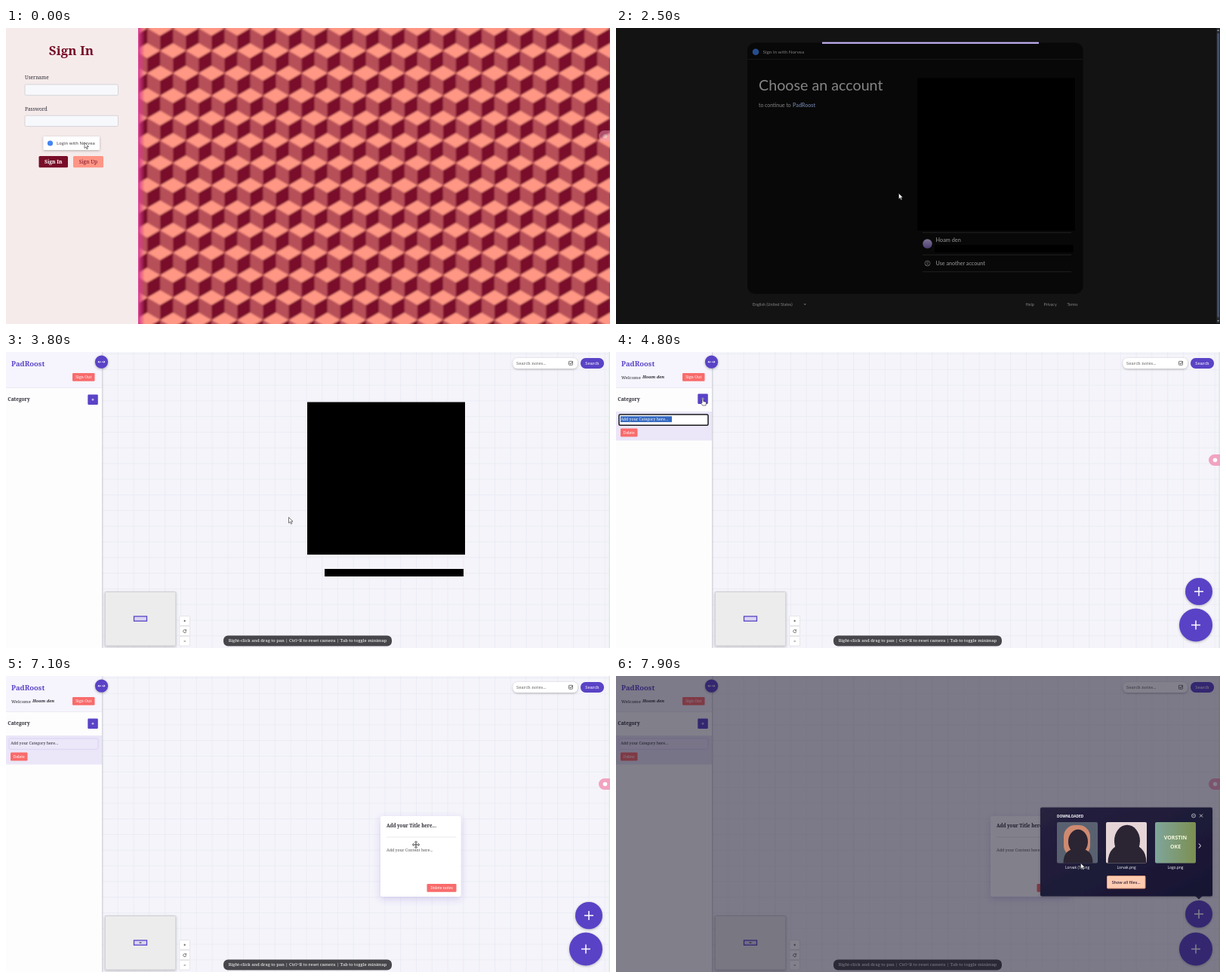
These frames come from a looping animation (800x393 px, 8000 ms). An HTML page:

```html
<!DOCTYPE html>
<html lang="en">
<head>
<meta charset="utf-8">
<title>Notes demo</title>
<style>
  html, body { margin: 0; width: 100%; height: 100%; overflow: hidden; background: #202124; }
  svg { display: block; width: 100vw; height: 100vh; }
  text { white-space: pre; }
  .serif { font-family: "Noto Serif", serif; }
  .sans { font-family: Lato, sans-serif; }
  .open { font-family: "Open Sans", sans-serif; }
</style>
</head>
<body>
<svg id="stage" viewBox="0 0 800 393" xmlns="http://www.w3.org/2000/svg"></svg>
<script>
const LOOP = 8000, STEP = 100;
const PURPLE = '#5a43c6', RED = '#f96b6b', INK = '#2b2b35';
const stage = document.getElementById('stage');

// y is the middle of the line
const text = (x, y, str, size, fill, extra = '', family = 'serif') =>
  `<text class="${family}" x="${x}" y="${y + size * 0.34}" font-size="${size}" fill="${fill}" ${extra}>${str}</text>`;
const rect = (x, y, w, h, fill, r = 0, extra = '') =>
  `<rect x="${x}" y="${y}" width="${w}" height="${h}" rx="${r}" fill="${fill}" ${extra}/>`;
const circle = (x, y, r, fill, extra = '') =>
  `<circle cx="${x}" cy="${y}" r="${r}" fill="${fill}" ${extra}/>`;
const line = (d, color, width = 0.6, extra = '') =>
  `<path d="${d}" fill="none" stroke="${color}" stroke-width="${width}" ${extra}/>`;
const group = (id, body) => `<g id="${id}">${body}</g>`;
const MID = 'text-anchor="middle"', BOLD = 'font-weight="700"', SHADE = 'filter="url(#shade)"';

function cubes(w, row) {
  const half = w / 2, r = row / 3;
  const one = (x, y) =>
    `<path fill="#ff9784" d="M${x - half} ${y}l${half} ${-r}l${half} ${r}l${-half} ${r}z"/>` +
    `<path fill="#790e29" d="M${x} ${y + r}l${half} ${-r}v${2 * r}l${-half} ${r}z"/>`;
  let s = rect(0, 0, w, row * 2, '#b75059');
  for (let k = -1; k < 3; k++)
    for (let i = -1; i < 3; i++) s += one(i * w + (k & 1 ? half : 0), k * row);
  return `<pattern id="cubes" width="${w}" height="${row * 2}" patternUnits="userSpaceOnUse" patternTransform="translate(408.6 .4)">${s}</pattern>`;
}

const defs = `<defs>
  ${cubes(34.06, 29.8)}
  <pattern id="grid" x="127" y="2" width="20.8" height="20.8" patternUnits="userSpaceOnUse">
    <path d="M0 .4H20.8M.4 0V20.8" stroke="#e9e9f3" stroke-width=".8"/></pattern>
  <filter id="soft" x="0" y="0" width="100%" height="100%"><feGaussianBlur stdDeviation=".8"/></filter>
  <filter id="shade" x="-30%" y="-30%" width="160%" height="170%">
    <feDropShadow dx="0" dy="1" stdDeviation="1.4" flood-color="#333" flood-opacity=".35"/></filter>
  <filter id="lift" x="-30%" y="-30%" width="160%" height="170%">
    <feDropShadow dx="0" dy="3" stdDeviation="5" flood-color="#5a43c6" flood-opacity=".22"/></filter>
  <linearGradient id="edge"><stop stop-color="#d63a8c"/><stop offset="1" stop-color="#d63a8c" stop-opacity="0"/></linearGradient>
  <linearGradient id="avatar" x2="0" y2="1"><stop stop-color="#d9c8fa"/><stop offset="1" stop-color="#8266c8"/></linearGradient>
  <linearGradient id="panel" x2="1" y2="1"><stop stop-color="#26213f"/><stop offset="1" stop-color="#171532"/></linearGradient>
  <linearGradient id="olive"><stop stop-color="#7fa69c"/><stop offset="1" stop-color="#7c8f50"/></linearGradient>
  <clipPath id="card"><rect x="174" y="18" width="444" height="335" rx="8"/></clipPath>
</defs>`;

const field = y => rect(25, y, 123.5, 14.3, '#f6f8fb', 1.5, 'stroke="#c9c9cf" stroke-width=".7"');
const signIn =
  rect(0, 0, 800, 393, '#f6ebeb') +
  rect(175, -3, 628, 400, 'url(#cubes)', 0, 'filter="url(#soft)"') +
  rect(175, 0, 9, 393, 'url(#edge)') +
  text(86.5, 30.5, 'Sign In', 17, '#780d28', MID + BOLD) +
  text(25, 66, 'Username', 6.5, INK) + field(75) +
  text(25, 107.5, 'Password', 6.5, INK) + field(116.3) +
  rect(49.5, 144, 74.5, 18, '#fff', 1, SHADE) +
  circle(58.5, 153, 3.6, '#4285f4') +
  text(67, 153.3, 'Login with Norvea', 5.8, '#666', 'font-weight="600"', 'open') +
  rect(43.5, 170, 38.5, 15.3, '#780d28', 1.5) +
  text(62.7, 177.7, 'Sign In', 6.7, '#fff', MID + ' font-weight="600"') +
  rect(89, 170, 40, 15.3, '#ff9585', 1.5) +
  text(109, 177.7, 'Sign Up', 6.7, '#780d28', MID + ' font-weight="500"');

const chooser =
  rect(0, 0, 800, 393, '#202022') +
  rect(174, 19.5, 444.5, 333.5, '#0e0e0e', 10) +
  circle(185, 31.7, 4.3, '#4285f4') +
  text(194.5, 31.7, 'Sign in with Norvea', 6.4, '#d5d5d5', '', 'sans') +
  line('M174 41.5H618', '#3a3a3a') +
  text(189, 76.5, 'Choose an account', 19.7, '#e3e3e3', '', 'sans') +
  text(189, 103, 'to continue to', 6.9, '#e3e3e3', '', 'sans') +
  text(234, 103, 'PadRoost', 7.1, '#a8c0f8', BOLD, 'sans') +
  line('M406 271.7H603M406 301.2H603M406 323.7H603', '#555') +
  circle(412.5, 286.5, 6.2, 'url(#avatar)') +
  text(423.5, 282, 'Hoam den', 7.3, '#e3e3e3', 'font-weight="600"', 'sans') +
  circle(412.5, 312.5, 3.5, 'none', 'stroke="#d0d0d0" stroke-width=".7"') +
  circle(412.5, 311.6, 1.1, 'none', 'stroke="#d0d0d0" stroke-width=".6"') +
  line('M410.2 314.9Q412.5 312.8 414.8 314.9', '#d0d0d0') +
  text(423.5, 312.5, 'Use another account', 7.2, '#e3e3e3', 'font-weight="600"', 'sans') +
  text(181, 367, 'English (United States)', 5.4, '#ddd', '', 'sans') +
  '<path d="M248.5 366.2h3.4l-1.7 1.8z" fill="#ccc"/>' +
  text(542.5, 367, 'Help', 5.4, '#ddd', '', 'sans') +
  text(566.5, 367, 'Privacy', 5.4, '#ddd', '', 'sans') +
  text(597.5, 367, 'Terms', 5.4, '#ddd', '', 'sans') +
  rect(0, 0, 800, 393, '#000', 0, 'id="dim"') +
  `<g clip-path="url(#card)">${rect(0, 18.7, 287, 2.2, '#c3b0f2', 0, 'id="bar"')}</g>` +
  rect(795.5, 0, 4.5, 393, '#2a2d34') + rect(796.3, 7, 2.6, 377, '#46526a', 1.3) +
  '<path d="M796.2 4l1.4-2 1.4 2zM796.2 388l1.4 2 1.4-2z" fill="#9aa"/>' +
  rect(0, 392, 800, 1, '#111');

const button = (x, y, w, h, label, size) =>
  rect(x, y, w, h, RED, 1.3) + text(x + w / 2, y + h / 2, label, size, '#fff', MID);
const zoom = (y, mark) =>
  rect(229.8, y - 6.4, 13.8, 12.6, '#fff', 1, 'stroke="#d5d5da" stroke-width=".6"') + line(mark, '#444', 0.7);
const plus = (x, y, r) => `M${x - r} ${y}h${2 * r}M${x} ${y - r}v${2 * r}`;
const fab = (id, x, y, r) =>
  group(id, circle(x, y, r, PURPLE, SHADE) + line(plus(x, y, 6), '#fff', 1.5));

const app =
  rect(0, 0, 800, 393, '#f4f4fa') + rect(127, 0, 673, 393, 'url(#grid)') +
  rect(0, 0, 127, 393, '#fdfdfe', 0, SHADE) +
  rect(0, 0, 127, 47.5, '#f6f4fc') + line('M0 47.5H127', '#e4e2ef') +
  text(7, 15.5, 'PadRoost', 9.4, PURPLE, BOLD) +
  group('welcome', text(7, 33.5, 'Welcome', 5.9, INK) +
    text(35, 33.5, 'Hoam den', 5.6, INK, BOLD + ' font-style="italic"')) +
  button(88, 28, 29.5, 10.8, 'Sign Out', 5.2) +
  text(2.3, 63.2, 'Category', 6.5, INK, BOLD) +
  group('add', rect(108.3, 56.5, 13.5, 13.5, PURPLE, 1.3) + line(plus(115, 63.2, 1.6), '#fff', 0.7)) +
  group('item', rect(0, 79, 127, 38.5, '#ebe6f8') +
    rect(4, 83, 118, 14.3, '#ece7f9', 1.5, 'id="input"') +
    rect(6, 85.3, 68, 7.8, '#3468c0', 0, 'id="mark"') +
    text(6.3, 89, 'Add your Category here...', 5.2, INK, 'id="label"') +
    button(6, 101.5, 22.5, 11, 'Delete', 5)) +
  circle(126.5, 13.2, 8.6, PURPLE, SHADE) +
  line('M126 13.2h-4m1.3-1.3l-1.3 1.3 1.3 1.3M127 13.2h4m-1.3-1.3l1.3 1.3-1.3 1.3', '#fff', 0.8) +
  rect(671.5, 8, 85.5, 14, '#fff', 6, SHADE) +
  text(676, 15, 'Search notes...', 5.8, '#666') +
  rect(745.5, 12.3, 5, 5, '#fff', 0.6, 'stroke="#444" stroke-width=".7"') +
  line('M746.5 14.7l1.3 1.4 2.8-3.5', '#333', 0.8) +
  rect(761, 8, 31, 14, PURPLE, 6.5) + text(776.5, 15, 'Search', 5.7, '#fff', MID) +
  rect(131.3, 318.5, 93.5, 71.5, '#ececec', 1, SHADE + ' stroke="#c8c8ce" stroke-width=".7"') +
  rect(169.5, 351, 17, 6.2, '#d9d5f0', 0, `stroke="${PURPLE}" stroke-width="1.3"`) +
  rect(0, 0, 2.8, 1.5, '#5a5a70', 0, 'id="dot"') +
  zoom(357, plus(236.7, 357, 1.3)) +
  zoom(370.5, 'M238.3 369.5a2 2 0 1 0 .4 1.6M238.7 368.3v1.7h-1.7') +
  zoom(384, 'M235.5 384h2.5') +
  rect(288, 376.5, 223, 14, '#47474b', 6) +
  text(399.5, 383.5, 'Right-click and drag to pan | Ctrl+R to reset camera | Tab to toggle minimap', 5.8, '#fff', MID) +
  group('note', rect(0, 0, 106.5, 107, '#fff', 3, 'filter="url(#lift)"') +
    text(8, 13, 'Add your Title here...', 6.15, INK, BOLD) +
    line('M8 28H100', '#dcdce4') +
    text(8, 45.5, 'Add your Content here...', 5.3, '#555') +
    button(61.5, 90, 39, 10.8, 'Delete notes', 5.1)) +
  group('fabs', fab('upper', 772, 318, 18) + fab('lower', 768, 362.5, 22)) +
  rect(798.5, 0, 1.5, 393, '#dcebd8');

const widget = '<path d="M800 136h-7.5a7.5 7.5 0 0 0 0 15h7.5z" fill="#f2a3c0"/>' +
  circle(793.5, 143.5, 2.8, '#fff');

const thumb = (x, bg, art, name) => rect(x, 194, 54, 54.5, bg, 2) + art +
  text(x + 27, 254, name, 4.9, '#fff', MID, 'open');
const figure = (x, y, r) =>
  `<path d="M${x - r * 1.5} 248.5q0-${r * 1.5} ${r * 1.5}-${r * 1.5}t${r * 1.5} ${r * 1.5}z" fill="#2b2433"/>` +
  `<ellipse cx="${x}" cy="${y}" rx="${r}" ry="${r * 1.25}" fill="#2b2433"/>`;
const popup =
  rect(0, 0, 800, 393, '#141024', 0, 'opacity=".53"') +
  '<path d="M766 291l6 5.5 6-5.5z" fill="#1b1836"/>' +
  rect(562, 174.5, 228, 118, 'url(#panel)', 2, SHADE) +
  text(584, 186, 'DOWNLOADED', 4.8, '#fff', BOLD, 'open') +
  circle(765, 185.5, 2.5, 'none', 'stroke="#ccc" stroke-width=".8"') +
  line('M763.5 185.5h3', '#ccc') +
  line('M773 183.5l4 4m0-4l-4 4', '#ddd', 0.8) +
  thumb(584, '#596170', rect(593, 198, 35, 42, '#cf8a70', 15) + figure(612, 220, 13), 'Lorvak (1).png') +
  thumb(649, '#e5d5d7', figure(677, 219, 17), 'Lorvak.png') +
  thumb(714, 'url(#olive)', text(741, 214.5, 'VORSTIN', 7, '#f4f7dc', MID + BOLD, 'open') +
    text(741, 226.5, 'OKE', 7, '#f4f7dc', MID + BOLD, 'open'), 'Logo.png') +
  line('M772 222.5l2.5 3-2.5 3', '#fff', 1) +
  rect(650.5, 265.5, 50.5, 16.5, '#ffcbb0', 1, 'stroke="#e89a78" stroke-width="1"') +
  text(675.7, 273.8, 'Show all files...', 5.4, '#33243a', MID + ' font-weight="600"', 'open');

const cursors =
  group('arrow', '<path d="M0 0v7.6l1.8-1.6 1.2 2.8 1.3-.6-1.2-2.7h2.4z" fill="#fff" stroke="#222" stroke-width=".6"/>') +
  group('hand', '<path d="M-1 1q0-1.2 .9-1.2t.9 1.2v2.5l2.9 .7q1 .3 .8 1.5l-.6 3.3h-4.2l-2.3-3.2q0-1.2 1.6-.2z" fill="#fff" stroke="#222" stroke-width=".6"/>') +
  group('move', line('M-3.5 0h7M0-3.5v7', '#fff', 2.2) + line('M-3.5 0h7M0-3.5v7', '#333', 0.9) +
    '<path d="M0-5l1.7 1.9h-3.4zM0 5l1.7-1.9h-3.4zM-5 0l1.9-1.7v3.4zM5 0l-1.9-1.7v3.4z" fill="#fff" stroke="#333" stroke-width=".6"/>');

stage.innerHTML = defs + group('signIn', signIn) + group('chooser', chooser) + group('app', app) +
  group('widget', widget) + group('popup', popup) + group('cursor', cursors) +
  group('masks', rect(399, 66.5, 209, 202.5, '#000') + rect(422, 288, 184, 10, '#000'));

const el = {};
stage.querySelectorAll('[id]').forEach(n => el[n.id] = n);
const show = (id, on) => el[id].setAttribute('display', on ? 'inline' : 'none');
const set = (id, attrs) => { for (const k in attrs) el[id].setAttribute(k, attrs[k]); };
const moveTo = (id, x, y) => set(id, { transform: `translate(${x} ${y})` });
const clamp = v => Math.min(1, Math.max(0, v));
const ease = v => v * v * (3 - 2 * v);

// [time, x, y] of the pointer
const path = [
  [0, 104, 152], [400, 104, 152], [900, 354.5, 169], [1500, 440, 283], [1850, 440, 283],
  [2400, 374.5, 219.5], [3900, 374.5, 219.5], [4500, 115, 62], [5000, 115, 62],
  [5400, 330, 180], [5900, 768, 358], [6100, 768, 358], [6500, 400, 138],
  [7000, 543, 224], [7250, 543, 224], [7500, 772, 316], [7600, 772, 316], [7900, 615.5, 248.5]
];
function pointer(t) {
  const i = path.findIndex(p => p[0] > t);
  if (i < 0) return path[path.length - 1].slice(1);
  const [t0, x0, y0] = path[i - 1], [t1, x1, y1] = path[i];
  const k = ease((t - t0) / (t1 - t0));
  return [x0 + (x1 - x0) * k, y0 + (y1 - y0) * k];
}

function draw(t) {
  const within = (a, b) => t >= a && t < b;
  const ready = t >= 4100, [x, y] = pointer(t);

  show('signIn', t < 400);
  show('chooser', within(400, 3800));
  show('app', t >= 3800);
  show('masks', within(400, 4000));
  show('widget', t < 400 || ready);
  set('widget', { opacity: ready ? 1 : 0.45 });
  show('welcome', ready);
  show('fabs', ready);
  show('popup', t >= 7700);

  set('dim', { opacity: 0.42 * clamp((t - 1900) / 300) });
  show('bar', within(1900, 3100));
  set('bar', { x: 273 + (t - 2500) * 0.6 });

  const editing = within(4700, 5400);
  show('item', t >= 4700);
  show('mark', editing);
  set('label', { fill: editing ? '#fff' : INK });
  set('input', {
    fill: editing ? '#fff' : '#ece7f9',
    stroke: editing ? '#17171d' : '#cfc5ee',
    'stroke-width': editing ? 1.5 : 0.6
  });
  moveTo('add', 0, within(4500, 5100) ? -1 : 0);

  const [nx, ny] = pointer(Math.min(Math.max(t, 6500), 7000));
  show('note', t >= 6000);
  show('dot', t >= 6000);
  moveTo('note', nx - 47, ny - 38);
  moveTo('dot', 176.6 + (nx - 543) * 0.026, 353.3 + (ny - 224) * 0.018);
  moveTo('upper', 0, t >= 7500 ? -2 : 0);

  const moving = within(6450, 7300);
  const hand = within(4500, 5100) || within(5850, 6150) || within(7450, 7650);
  show('move', moving);
  show('hand', hand);
  show('arrow', !moving && !hand);
  moveTo('cursor', x, y);
}

const start = performance.now();
function tick() {
  const t = (performance.now() - start) % LOOP;
  draw(Math.floor(t / STEP) * STEP);
  requestAnimationFrame(tick);
}
tick();
</script>
</body>
</html>
```
